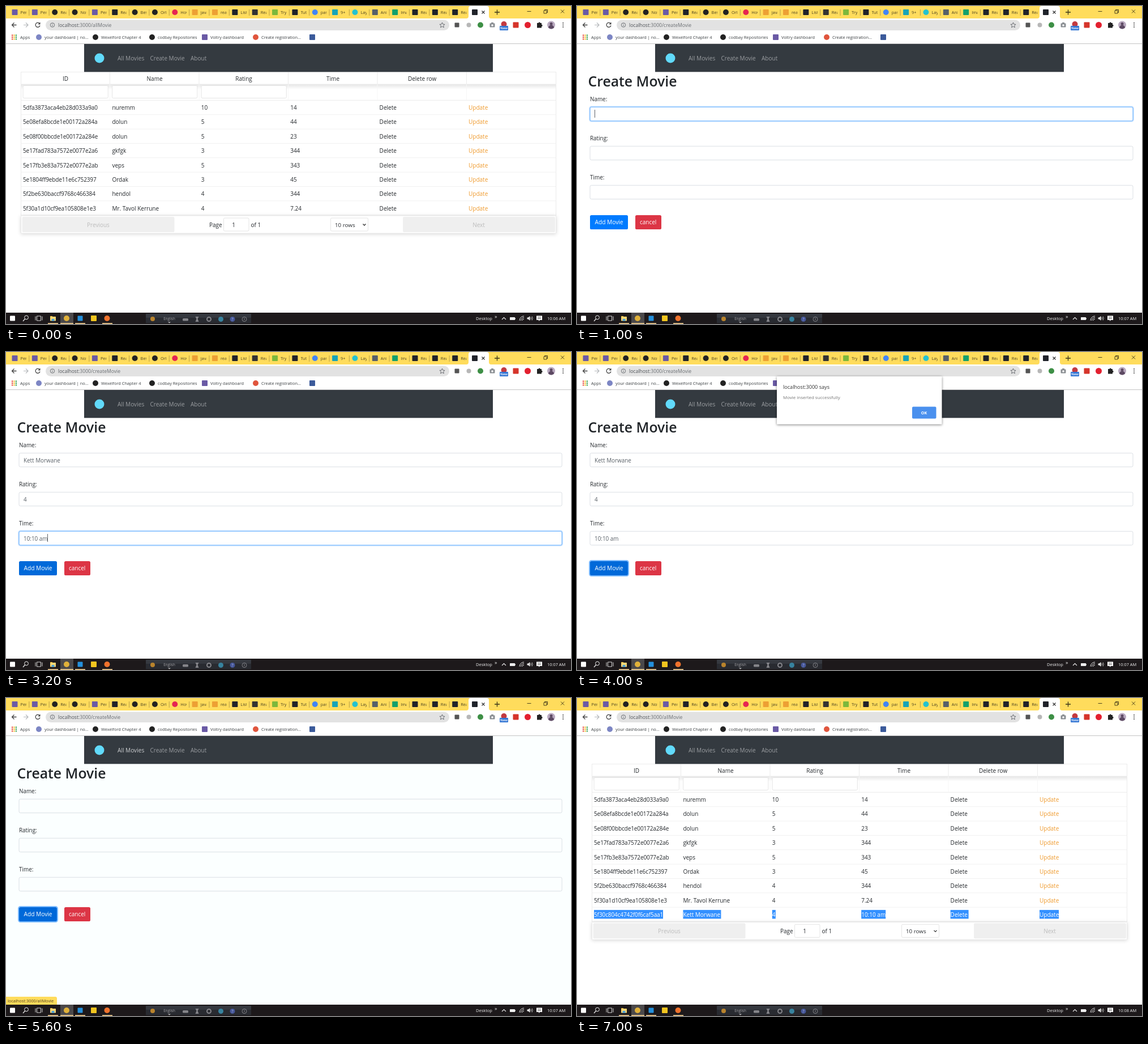
Recreate the animation shown at these times as an HTML page. Size 998 px wide and 561 px high, loop 8000 ms.

```html
<!DOCTYPE html>
<html lang="en">
<head>
<meta charset="utf-8">
<title>Movie list</title>
<style>
  html, body { margin: 0; width: 100%; height: 100%; overflow: hidden; background: #fff; }
  svg { display: block; width: 998px; height: 561px; }
  text { font-family: "Open Sans", "Noto Sans", sans-serif; white-space: pre; }
  .soft { filter: drop-shadow(0 1px 3px rgba(0,0,0,.16)); }
  .pop { filter: drop-shadow(0 1px 2px rgba(0,0,0,.5)); }
</style>
</head>
<body>
<svg id="stage" viewBox="0 0 998 561"></svg>
<script>
const INK = '#25292d', DARK = '#20232a', YELLOW = '#ffdc5c', PURPLE = '#6a5aa5';

const text = (x, y, s, size = 10, fill = INK, more = '') =>
  `<text x="${x}" y="${y}" font-size="${size}" fill="${fill}" ${more}>${s}</text>`;
const mid = (x, y, s, size, fill, more = '') =>
  text(x, y, s, size, fill, 'text-anchor="middle" ' + more);
const rect = (x, y, w, h, fill, r = 0, more = '') =>
  `<rect x="${x}" y="${y}" width="${w}" height="${h}" fill="${fill}" rx="${r}" ${more}/>`;
const dot = (x, y, r, fill, more = '') =>
  `<circle cx="${x}" cy="${y}" r="${r}" fill="${fill}" ${more}/>`;
const line = (d, color, w = 1, more = '') =>
  `<path d="${d}" fill="none" stroke="${color}" stroke-width="${w}" ${more}/>`;
const group = (id, body) => `<g id="${id}">${body}</g>`;
const mark = (x, y, shape, color, size = 10) => shape === 'o'
  ? dot(x, y, size / 2, color)
  : rect(x - size / 2, y - size / 2, size, size, color, 1);

// Browser window
function tabs() {
  const list = [
    ['Pers', 's', PURPLE], ['Pers', 's', PURPLE], ['Rea', 'o', '#222'], ['Not', 'o', '#222'],
    ['Pers', 's', PURPLE], ['Rea', 's', DARK], ['Best', 'o', '#222'], ['Orlo', 'o', '#222'],
    ['How', 'o', '#e62552'], ['java', 's', '#eda034'], ['reac', 's', '#eda034'], ['List', 's', DARK],
    ['Rea', 's', '#333'], ['Try', 's', '#7cb83c'], ['Tuto', 's', DARK], ['pass', 'o', '#4285f4'],
    ['9+ b', 's', '#16a4b8'], ['Layo', 'o', '#25c2cf'], ['Ani', 's', '#56606a'], ['Ima', 's', '#12a06c'],
    ['Rea', 's', DARK], ['Rea', 's', DARK], ['Rea', 's', DARK]
  ];
  const pitch = 35.35;
  let out = rect(0, 0, 998, 22, YELLOW);
  list.forEach(([name, shape, color], i) => {
    const x = 15.5 + i * pitch;
    out += mark(x, 11, shape, color)
      + `<svg x="${x + 10}" y="0" width="10.5" height="22">${text(0, 14, name, 7.4, '#4a4220')}</svg>`;
    if (i < list.length - 1) out += line(`M${x + 25.3} 6V17`, '#a89243', .8);
  });
  return out
    + '<path d="M813 22q4 0 4-4V4q0-4 4-4h28q4 0 4 4v14q0 4 4 4z" fill="#fff"/>'
    + mark(828, 11, 's', DARK)
    + line('M840.5 8.5l5 5m0-5l-5 5', '#333', 1.2)
    + line('M863 11h9M867.5 6.5v9', '#3b3418', 1.3)
    + line('M920.5 9.5h7M950 8h5v5h-5zM951.5 8V6.5h5v5H955M980 6.5l6 6m0-6l-6 6', '#3b3418', .9);
}

function toolbar() {
  let out = rect(0, 22, 998, 44.5, '#fff')
    + line('M18.5 33.5H10.5m4-4l-4 4 4 4', '#444', 1.3)
    + line('M31 33.5h8m-4-4l4 4-4 4', '#b5b8bb', 1.2)
    + line('M59.5 31.2a4 4 0 1 0 .5 3.3', '#444', 1.3)
    + '<path d="M60.5 28.5v4h-4z" fill="#444"/>'
    + rect(70, 24.5, 713, 18.5, '#e2e2e2', 9.2)
    + dot(82, 33.5, 3.7, 'none', 'stroke="#5f6368" stroke-width=".9"')
    + line('M82 33v2.4M82 31.2v.9', '#5f6368', .9)
    + '<path d="M770.5 29l1.3 3.1 3.3.3-2.5 2.2.8 3.3-2.9-1.8-2.9 1.8.8-3.3-2.5-2.2 3.3-.3z" fill="none" stroke="#5f6368" stroke-width=".9"/>';
  [[796.5, 's', '#555', 8], [817.5, 'o', '#b7b7b7', 8], [838, 'o', '#3d8f45', 10],
   [900.5, 's', '#d6352b', 10], [921.5, 'o', '#e3202f', 11]]
    .forEach(m => out += mark(m[0], 33.5, m[1], m[2], m[3]));
  return out
    + rect(854.5, 30.5, 9, 7, '#8b8f93', 1) + rect(857, 29, 4, 2, '#8b8f93')
    + dot(859, 34, 1.8, '#fff')
    + dot(879.5, 32, 5, '#c23a40') + rect(872, 35, 15, 8, '#3577d4', 1)
    + mid(879.5, 41.4, 'New', 6, '#fff', 'font-weight="600"')
    + '<path d="M938 30h2.5a1.6 1.6 0 0 1 3.2 0h2.3v2.8a1.6 1.6 0 0 1 0 3.2v2.5h-8z" fill="#222"/>'
    + dot(963, 33.5, 7, '#b9a9bf') + dot(963, 31.5, 2.5, '#5d4a63')
    + '<path d="M958 38.3a5 4.5 0 0 1 10 0a7 7 0 0 1-10 0z" fill="#5d4a63"/>'
    + [30, 33.5, 37].map(y => dot(984, y, 1, '#444')).join('');
}

function bookmarks() {
  const list = [
    [68, 'your dashboard | no...', 'o', '#7d86c4'], [168, 'Wexelford Chapter 4', 'o', '#222'],
    [268, 'codbay Repositories', 'o', '#222'], [361, 'Voltry dashboard', 's', PURPLE],
    [451, 'Create registration...', 'o', '#e0553d']
  ];
  const hues = ['#e8453c', '#f5b91f', '#38a156', '#4285f4'];
  let out = '';
  for (let i = 0; i < 9; i++)
    out += rect(10 + i % 3 * 3.4, 50.5 + (i / 3 | 0) * 3.4, 2.2, 2.2, hues[(i + (i / 3 | 0)) % 4]);
  out += text(25, 57.6, 'Apps', 7.4, '#3c4043');
  for (const [x, s, shape, color] of list)
    out += mark(x - 10, 55, shape, color) + text(x, 57.6, s, 7.4, '#3c4043');
  return out + mark(541, 55, 's', '#3b5a9a') + rect(0, 66, 998, 1, '#c4c4c4');
}

const navbar = () => rect(138, 67, 722, 49.3, '#343a40')
  + dot(165, 92, 8.5, '#61dafb')
  + text(197, 96, 'All Movies', 10.1, '#9a9da0', 'id="navAll"')
  + text(254.5, 96, 'Create Movie', 10, '#9a9da0')
  + text(326, 96, 'About', 10, '#9a9da0');

// Movie table
const COL = 157.5, ROW = 25.35, EDGE = '#f1f1f1';
const movies = [
  ['5dfa3873aca4eb28d033a9a0', 'nuremm', '10', '14'],
  ['5e08efa8bcde1e00172a284a', 'dolun', '5', '44'],
  ['5e08f00bbcde1e00172a284e', 'dolun', '5', '23'],
  ['5e17fad783a7572e0077e2a6', 'gkfgk', '3', '344'],
  ['5e17fb3e83a7572e0077e2ab', 'veps', '5', '343'],
  ['5e1804ff9ebde11e6c752397', 'Ordak', '3', '45'],
  ['5f2be630baccf9768c466384', 'hendol', '4', '344'],
  ['5f30a1d10cf9ea105808e1e3', 'Mr. Tavol Kerrune', '4', '7.24']
];
const added = ['5f30c804c4742f0f6caf5aa1', 'Kett Morwane', '4', '10:10 am'];

function row(cells, i, picked) {
  const y = 183.1 + i * ROW, marks = [122, 67, 6, 43, 32, 34];
  return [...cells, 'Delete', 'Update'].map((s, c) => {
    const x = 30 + c * COL - c * .1;
    const fill = picked ? '#fff' : c === 5 ? '#ef9b2f' : INK;
    return (picked ? rect(x, y - 12, marks[c], 15.5, '#3390ff') : '')
      + text(x, y, s, 10, fill, c ? '' : 'letter-spacing="-.1"');
  }).join('') + line(`M26 ${y + 8.6}H972`, EDGE);
}

function table() {
  let out = '<defs><linearGradient id="fade" x2="0" y2="1">'
    + '<stop stop-color="#000" stop-opacity=".1"/><stop offset="1" stop-color="#000" stop-opacity="0"/></linearGradient></defs>'
    + rect(26, 138, 946, 9, 'url(#fade)') + line('M26 116.5H972M26 138H972M26 166.3H972', '#ececec');
  ['ID', 'Name', 'Rating', 'Time', 'Delete row'].forEach((s, i) => {
    const x = 26 + (i + 1) * COL;
    out += mid(x - COL / 2 + .3, 131.8, s) + line(`M${x} 117V138`, '#ebebeb') + line(`M${x} 138V166`, '#f6f6f6');
    if (i < 3) out += rect(30 + i * COL, 140.5, 150.3, 22, '#fff', 2, 'stroke="#e4e4e4"');
  });
  return out + movies.map((m, i) => row(m, i)).join('');
}

const tableSides = h => line(`M26.5 116V${h}M971.5 116V${h}`, '#ebebeb');

const pager = () => rect(26.5, 370, 945, 31, '#fff', 1, 'class="soft" stroke="#e6e6e6" stroke-width=".8"')
  + rect(28.5, 372, 269, 27, '#efefef', 2) + mid(163, 389.5, 'Previous', 10, '#bcbcbc')
  + rect(701, 372, 269, 27, '#efefef', 2) + mid(835, 389.5, 'Next', 10, '#bcbcbc')
  + text(359, 389.5, 'Page') + text(432.5, 389.5, 'of 1')
  + rect(384.5, 374, 44.5, 23, '#fff', 2, 'stroke="#e4e4e4"') + mid(402, 389.5, '1')
  + rect(573.5, 374, 66, 23, '#fff', 2, 'stroke="#e4e4e4"') + text(581, 389.5, '10 rows', 9.8)
  + line('M630.5 384.5l2.5 2.5 2.5-2.5', '#333', 1.3);

// Create form
const field = (y, label) => text(23, y - 10.2, label, 9.9)
  + rect(23, y + .3, 959, 24.4, 'none', 2.6, 'stroke="#d7dce1" stroke-width=".9"');
const focus = y => rect(22.5, y - .2, 960, 25.4, 'none', 3, 'stroke="#bfdeff" stroke-width="2.6"')
  + rect(23, y + .3, 959, 24.4, 'none', 2.6, 'stroke="#80bdff"');
const caret = (x, y) => rect(x, y + 5, .9, 14, '#495057');

const form = () => text(19.5, 142, 'Create Movie', 24.8, '#212529', 'font-weight="600"')
  + field(178, 'Name:') + field(247, 'Rating:') + field(316, 'Time:')
  + group('ring', rect(22, 368, 69, 27, 'none', 3.5, 'stroke="#80bdff" stroke-width="2"'))
  + rect(23, 369, 67, 25, '#007bff', 2.6, 'id="add"') + mid(56.5, 385.4, 'Add Movie', 10.2, '#fff')
  + rect(103, 369, 46, 25, '#dc3545', 2.6) + mid(125.7, 385.4, 'cancel', 10, '#fff');

const values = () => [[194.7, added[1]], [263.7, '4'], [332.5, '10:10 am']]
  .map(([y, s]) => text(31, y, s, 9.9, '#5a6168')).join('');

const dialog = () => rect(353, 43, 291.5, 84.5, '#fff', 1, 'class="pop"')
  + text(364, 65, 'localhost:3000 says', 9.1, '#333')
  + text(364, 83, 'Movie inserted successfully', 7.95, '#757575')
  + rect(592, 96.5, 42.5, 21, '#4a90ee', 2) + mid(613, 109.5, 'OK', 7.2, '#fff', 'font-weight="700"');

const status = () => '<path d="M0 527h87q3 0 3 3v11.5H0z" fill="#ffdc5c"/>'
  + text(3, 536.8, 'localhost:3000/allMovie', 7.4, '#4a4220');

// Desktop taskbar
function taskbar() {
  let out = rect(0, 541, 998, 20, '#1d191b') + rect(96, 541, 23, 20, '#4b494b');
  [[11.5, 's', '#fff', 9], [107, 'o', '#e0b13a', 10], [131, 's', '#2490dc', 9],
   [155, 's', '#f2c51f', 10], [178.5, 'o', '#f0722c', 10]]
    .forEach(m => out += mark(m[0], 551, m[1], m[2], m[3]));
  out += dot(36, 549.5, 3.4, 'none', 'stroke="#eee"') + line('M33.6 552l-3.6 4', '#eee', 1.2)
    + line('M54.5 547h7v8h-7zM52 547.5v7M64 547.5v7', '#eee', .9)
    + rect(78, 547, 4, 3, '#e8b53a') + rect(78, 548, 10, 7.5, '#f8d775', .5) + rect(80.5, 552, 5, 3.5, '#4ba3dc');
  [74, 96, 122, 170].forEach((x, i) => out += rect(x, 559.3, i === 1 ? 23 : 18, 1.7, '#f3cf91'));
  out += rect(247, 543, 186, 16.5, '#292b31', 1) + rect(247, 543, 186, 7, '#35383f', 1)
    + mark(259, 552, 'o', '#b9832c', 8) + mid(288.5, 554, 'English', 6.2, '#a5a5a9')
    + '<path d="M286 557.5h5l-2.5 2z" fill="#ccc"/>'
    + rect(312, 551, 10, 4.5, '#85858a', 1.5)
    + '<path d="M334.5 548h6l-2 4 2 5h-6l2-5z" fill="#85858a"/>'
    + dot(358.5, 552.5, 3.5, 'none', 'stroke="#85858a" stroke-width="2"')
    + dot(379.5, 552.5, 4.5, '#37839f') + dot(400, 552.5, 4.5, '#46579a')
    + mid(400, 555, '?', 7, '#b8c1e6') + dot(421, 552.5, 4, 'none', 'stroke="#85858a"')
    + line('M421 550.5v3.5', '#85858a');
  return out + text(830, 553.7, 'Desktop', 7.5, '#eee') + text(863, 551, '»', 9, '#eee')
    + line('M876 553l3.5-3.5 3.5 3.5', '#eee', 1.1)
    + rect(890, 549, 9, 5, '#eee', .5) + rect(899, 550.5, 1, 2, '#eee')
    + line('M907 555a8 8 0 0 1 8-8M909.5 555a5.5 5.5 0 0 1 5.5-5.5M912 555a3 3 0 0 1 3-3', '#ddd')
    + '<path d="M920.5 549.5h2l3-2.5v8l-3-2.5h-2z" fill="#eee"/>'
    + line('M927 549q1.5 2 0 4M929 547.5q2.5 3.5 0 7', '#eee', .8)
    + '<path d="M937 546.5h10v7.5h-4l-2 2v-2h-4z" fill="#fff"/>' + line('M939 549h6M939 551.5h6', '#333', .8)
    + text(956, 553.6, '', 7.4, '#f4f4f4', 'id="clock"');
}

const stage = document.getElementById('stage');
stage.innerHTML = rect(0, 0, 998, 561, '#fff', 0, 'id="page"')
  + group('list', table() + group('shortSides', tableSides(370))
      + group('newRow', row(added, 8, true) + tableSides(395)) + group('pager', pager()))
  + group('form', form())
  + group('values', values())
  + group('nameFocus', focus(178) + caret(31, 178))
  + group('timeFocus', focus(316) + caret(73, 316))
  + navbar() + tabs() + toolbar() + text(92, 36.6, '', 8.6, '#4d5156', 'id="path"')
  + bookmarks() + group('dialog', dialog()) + group('status', status()) + taskbar();

// Start time, clock, visible parts
const steps = [
  [0, '10:06', 'list shortSides'],
  [1000, '10:07', 'form nameFocus'],
  [2000, '10:07', 'form values timeFocus hover'],
  [4000, '10:07', 'form values hover ring dialog'],
  [5000, '10:07', 'form hover ring status'],
  [6000, '10:08', 'list newRow']
];
const LOOP = 8000;
const parts = ['list', 'shortSides', 'newRow', 'form', 'values', 'nameFocus', 'timeFocus', 'ring', 'dialog', 'status'];
const el = id => document.getElementById(id);
let shown;

function show(step) {
  const on = step[2].split(' ');
  const paint = (id, part, yes, no) => el(id).setAttribute('fill', on.includes(part) ? yes : no);
  parts.forEach(id => el(id).style.display = on.includes(id) ? '' : 'none');
  paint('add', 'hover', '#0069d9', '#007bff');
  paint('navAll', 'status', '#ccced0', '#9a9da0');
  paint('page', 'status', '#fbffff', '#fff');
  el('pager').setAttribute('transform', `translate(0 ${on.includes('newRow') ? ROW : 0})`);
  el('path').innerHTML = 'localhost<tspan fill="#6a6e72">:3000/' + (on.includes('list') ? 'allMovie' : 'createMovie') + '</tspan>';
  el('clock').textContent = step[1] + ' AM';
}

const start = performance.now();
function tick() {
  const t = (performance.now() - start) % LOOP;
  const step = steps.filter(s => s[0] <= t).pop();
  if (step !== shown) show(shown = step);
  requestAnimationFrame(tick);
}
tick();
</script>
</body>
</html>
```
